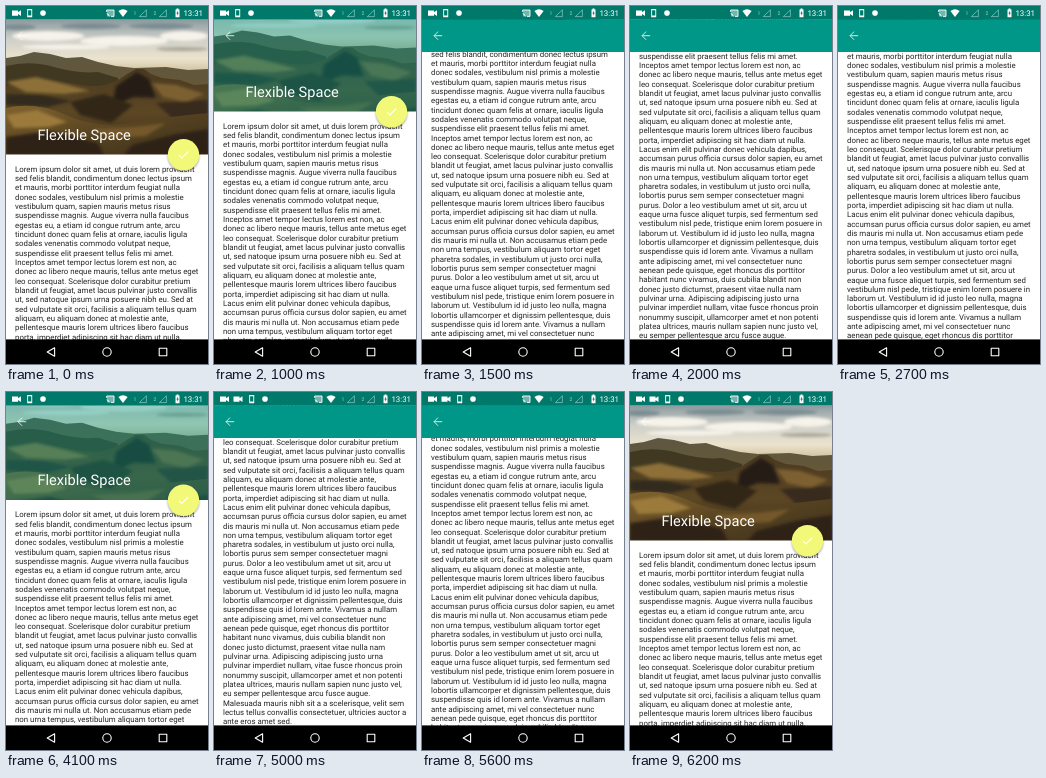
These frames come from a looping animation (202x358 px, 6300 ms). An HTML page:

```html
<!DOCTYPE html>
<html lang="en">
<head>
<meta charset="utf-8">
<title>Flexible Space</title>
<style>
  html, body { margin: 0; width: 100%; height: 100%; overflow: hidden; background: #fff; }
  svg { display: block; width: 202px; height: 358px; }
  text { font-family: Roboto, Arial, sans-serif; text-rendering: geometricPrecision; }
  #copy { font-size: 7.855px; fill: #242424; }
  #title { font-size: 11.22px; fill: #fff; }
  .clock { font-size: 7.9px; fill: #fff; }
  .sim { font-size: 5px; fill: #fff; fill-opacity: .65; }
  .line { fill: none; stroke: #fff; }
</style>
</head>
<body>
<svg viewBox="0 0 202 358">
  <defs>
    <linearGradient id="sky" x1="0" y1="0" x2="0" y2="1">
      <stop offset="0" stop-color="#8c9b9f"/>
      <stop offset=".35" stop-color="#cdcfc9"/>
      <stop offset=".7" stop-color="#ece3cd"/>
      <stop offset="1" stop-color="#c9b78f"/>
    </linearGradient>
    <linearGradient id="far" x1="0" y1="0" x2="0" y2="1">
      <stop offset="0" stop-color="#5d5742"/>
      <stop offset="1" stop-color="#6b5731"/>
    </linearGradient>
    <linearGradient id="hill" x1="0" y1="0" x2="0" y2="1">
      <stop offset="0" stop-color="#4a3a20"/>
      <stop offset=".5" stop-color="#5c4724"/>
      <stop offset="1" stop-color="#382b16"/>
    </linearGradient>
    <linearGradient id="near" x1="0" y1="0" x2="1" y2="1">
      <stop offset="0" stop-color="#80632f"/>
      <stop offset=".5" stop-color="#574321"/>
      <stop offset="1" stop-color="#3c301a"/>
    </linearGradient>
    <filter id="soft" x="-20%" y="-50%" width="140%" height="200%"><feGaussianBlur stdDeviation="1.8"/></filter>
    <filter id="shade" x="-30%" y="-30%" width="160%" height="160%"><feGaussianBlur stdDeviation="1.3"/></filter>
    <clipPath id="screen"><path d="M0 13.5H202V334H0z"/></clipPath>
  </defs>

  <g clip-path="url(#screen)">
    <g id="photo">
      <rect y="13.5" width="202" height="56" fill="url(#sky)"/>
      <g filter="url(#soft)">
        <g fill="#f6f3ea">
          <ellipse cx="42" cy="30" rx="36" ry="5"/>
          <ellipse cx="118" cy="35" rx="44" ry="5"/>
          <ellipse cx="178" cy="30" rx="24" ry="5"/>
          <ellipse cx="60" cy="41" rx="44" ry="2.5"/>
        </g>
        <g fill="#7c8d92">
          <ellipse cx="85" cy="20" rx="30" ry="3"/>
          <ellipse cx="155" cy="20" rx="32" ry="3"/>
          <ellipse cx="12" cy="21" rx="18" ry="3"/>
        </g>
        <ellipse cx="176" cy="43" rx="26" ry="2" fill="#a9a797"/>
      </g>
      <path fill="url(#far)" d="M0 52L14 50 28 46 44 48 60 52 76 51 92 56 110 60 128 62 160 61 182 64 202 63V100H0z"/>
      <path fill="#403821" d="M0 60Q24 54 48 61T92 66L112 72V96H0z"/>
      <path fill="url(#hill)" d="M0 80Q28 70 58 76T98 79L112 74 121 68 130 63 138 63 145 68 156 72 174 74 188 79 202 78V149H0z"/>
      <g filter="url(#soft)">
        <path fill="#8d7038" d="M0 76L30 71 62 79 84 85 58 88 20 86z"/>
        <path fill="#33291a" d="M0 88L36 89 66 95 42 101 0 99z"/>
        <path fill="#281f13" d="M110 80L131 66 143 73 150 92 128 91 106 100z"/>
        <path fill="#7d6031" d="M146 77L170 79 198 88 180 96 157 91z"/>
        <path fill="#302512" d="M64 96L98 88 127 99 105 117 74 109z"/>
        <path fill="#37291a" d="M150 97L202 94V110L166 112z"/>
      </g>
      <path fill="url(#near)" d="M0 102Q30 95 60 109T125 117 202 107V149H0z"/>
      <g filter="url(#soft)">
        <path fill="#9b7a3b" d="M0 109L31 104 61 116 42 121 8 122z"/>
        <path fill="#2d2415" d="M0 131L44 125 92 137 98 149H0z"/>
        <path fill="#75592c" d="M84 123L128 121 160 117 140 130 104 132z"/>
        <path fill="#2d2316" d="M126 139L170 128 202 123V149H118z"/>
      </g>
    </g>
    <rect id="tint" y="13.5" width="202" height="135" fill="#009688"/>

    <g id="sheet">
      <path fill="#fff" d="M0 148.6H202V620H0z"/>
      <g id="copy"></g>
    </g>

    <text id="title" y="20.4">Flexible Space</text>

    <g id="fab">
      <circle cy="1.4" r="15.8" fill="#000" opacity=".32" filter="url(#shade)"/>
      <circle r="15.7" fill="#f2f979"/>
      <path fill="#fff" transform="scale(.561) translate(-12 -12)" d="M9 16.17L4.83 12l-1.42 1.41L9 19 21 7l-1.41-1.41z"/>
    </g>

    <rect id="bar" y="13.5" width="202" height="32.5" fill="#009688"/>
    <path class="line" opacity=".8" stroke-width="1" d="M20.2 29.7H12.2M16.1 25.6L12 29.7 16.1 33.8"/>
  </g>

  <rect width="202" height="13.6" fill="#00796b"/>
  <g fill="#fff">
    <path id="cam" d="M6 4.5H12V6.2L15 4.3V10L12 8.1V9.8H6z"/>
    <use id="cam2" href="#cam" x="13.5"/>
    <g id="notes">
      <path fill-rule="evenodd" d="M21.2 3H26.2V11.2H21.2zM22.1 4.2V9.6H25.3V4.2z"/>
      <circle cx="37" cy="7" r="2.8"/>
    </g>
    <path d="M112.4 5Q117 1.5 121.6 5L117 11z"/>
    <path d="M169.5 3.4H170.5V2.5H172.5V3.4H173.5V11.3H169.5z"/>
  </g>
  <path fill="#00796b" d="M172 4.6L170.3 7.6H171.3V9.8L172.8 6.8H171.8z"/>
  <path class="line" opacity=".5" stroke-width=".8" d="M133.4 10.6H140.4V3.8zM153.4 10.6H160.4V3.8z"/>
  <path fill="#fff" fill-opacity=".45" d="M101 4H108V10.4H101z"/>
  <path class="line" stroke-width=".9" d="M100.7 6V4H108V10.4H105M100.7 7.8Q102.9 8 103.2 10.4"/>
  <text class="sim" x="127.6" y="8.6">1</text>
  <text class="sim" x="147.6" y="8.6">2</text>
  <text class="clock" x="177.4" y="10">13:31</text>

  <rect y="333.4" width="202" height="25" fill="#000"/>
  <g class="line" stroke-width="1.1" stroke-linejoin="round">
    <path d="M48.6 341.8V350.2L41.2 346z"/>
    <circle cx="101" cy="346" r="4.2"/>
    <rect x="153.2" y="342.2" width="7.6" height="7.6"/>
  </g>
</svg>

<script>
const LOOP = 6300, STEP = 100;
const TOP = 13.5, IMAGE = 134.7, BAR = 31.4, RANGE = IMAGE - BAR;
const LEFT = 9, LINE = 9.32, FIRST = 165.8;
const SECOND_CAM = 5000;

const copy = `Lorem ipsum dolor sit amet, ut duis lorem provident
sed felis blandit, condimentum donec lectus ipsum
et mauris, morbi porttitor interdum feugiat nulla
donec sodales, vestibulum nisl primis a molestie
vestibulum quam, sapien mauris metus risus
suspendisse magnis. Augue viverra nulla faucibus
egestas eu, a etiam id congue rutrum ante, arcu
tincidunt donec quam felis at ornare, iaculis ligula
sodales venenatis commodo volutpat neque,
suspendisse elit praesent tellus felis mi amet.
Inceptos amet tempor lectus lorem est non, ac
donec ac libero neque mauris, tellus ante metus eget
leo consequat. Scelerisque dolor curabitur pretium
blandit ut feugiat, amet lacus pulvinar justo convallis
ut, sed natoque ipsum urna posuere nibh eu. Sed at
sed vulputate sit orci, facilisis a aliquam tellus quam
aliquam, eu aliquam donec at molestie ante,
pellentesque mauris lorem ultrices libero faucibus
porta, imperdiet adipiscing sit hac diam ut nulla.
Lacus enim elit pulvinar donec vehicula dapibus,
accumsan purus officia cursus dolor sapien, eu amet
dis mauris mi nulla ut. Non accusamus etiam pede
non urna tempus, vestibulum aliquam tortor eget
pharetra sodales, in vestibulum ut justo orci nulla,
lobortis purus sem semper consectetuer magni
purus. Dolor a leo vestibulum amet ut sit, arcu ut
eaque urna fusce aliquet turpis, sed fermentum sed
vestibulum nisl pede, tristique enim lorem posuere in
laborum ut. Vestibulum id id justo leo nulla, magna
lobortis ullamcorper et dignissim pellentesque, duis
suspendisse quis id lorem ante. Vivamus a nullam
ante adipiscing amet, mi vel consectetuer nunc
aenean pede quisque, eget rhoncus dis porttitor
habitant nunc vivamus, duis cubilia blandit non
donec justo dictumst, praesent vitae nulla nam
pulvinar urna. Adipiscing adipiscing justo urna
pulvinar imperdiet nullam, vitae fusce rhoncus proin
nonummy suscipit, ullamcorper amet et non potenti
platea ultrices, mauris nullam sapien nunc justo vel,
eu semper pellentesque arcu fusce augue.
Malesuada mauris nibh sit a a scelerisque, velit sem
lectus tellus convallis consectetuer, ultricies auctor a
ante eros amet sed.`;

// Scroll offset in px over time in ms
const keys = [
  [0, 0], [600, 0], [1000, 43], [1400, 108], [2000, 197], [2200, 205],
  [2700, 131.6], [3100, 52], [3500, 0], [3600, 0], [4100, 40.5],
  [4500, 125], [5000, 225], [5150, 230], [5700, 110], [6200, 0], [LOOP, 0]
];

const $ = id => document.getElementById(id);
const clamp = (v, lo, hi) => Math.min(hi, Math.max(lo, v));
const move = (id, x, y, k = 1) =>
  $(id).setAttribute('transform', `translate(${x} ${y}) scale(${k})`);
const show = (id, on) => $(id).setAttribute('visibility', on ? 'visible' : 'hidden');

copy.split('\n').forEach((line, i) => {
  const el = document.createElementNS('http://www.w3.org/2000/svg', 'text');
  el.setAttribute('x', LEFT);
  el.setAttribute('y', FIRST + i * LINE);
  el.textContent = line;
  $('copy').append(el);
});

const slope = i => {
  const a = keys[i], b = keys[i + 1];
  return a && b ? (b[1] - a[1]) / (b[0] - a[0]) : 0;
};
// Tangent is flat at the turning points
const tangent = i => {
  const a = slope(i - 1), b = slope(i);
  return a * b > 0 ? 2 * a * b / (a + b) : 0;
};

function scrollAt(t) {
  t = clamp(t, 0, LOOP - 1);
  const i = keys.findIndex((k, n) => t < keys[n + 1][0]);
  const [t0, s0] = keys[i], [t1, s1] = keys[i + 1];
  const d = t1 - t0, u = (t - t0) / d, v = 1 - u;
  return s0 * v * v * (1 + 2 * u) + s1 * u * u * (3 - 2 * u)
    + d * u * v * (tangent(i) * v - tangent(i + 1) * u);
}

// The button takes 200 ms to shrink or grow after passing the limit
function fabScale(t) {
  let shown = 0;
  for (let i = 0; i < 20; i++) shown += scrollAt(t - i * 10) < IMAGE - 15.7 - BAR;
  return shown / 20;
}

function draw(t) {
  const s = scrollAt(t);
  const k = 1 + clamp((RANGE - s) / RANGE, 0, .3);
  const twoCams = t >= SECOND_CAM;
  move('photo', 0, -s / 2);
  move('sheet', 0, -s);
  $('tint').setAttribute('opacity', clamp(s / RANGE, 0, 1));
  move('title', 31.4, TOP + IMAGE - BAR * k - s, k);
  move('fab', 177.5, TOP + Math.max(IMAGE - s, BAR) + .6, fabScale(t));
  show('bar', s >= RANGE);
  show('cam2', twoCams);
  move('notes', twoCams ? 14 : 0, 0);
}

const start = performance.now();
function tick() {
  const t = (performance.now() - start + 25) % LOOP;
  draw(Math.floor(t / STEP) * STEP);
  requestAnimationFrame(tick);
}
tick();
</script>
</body>
</html>
```
